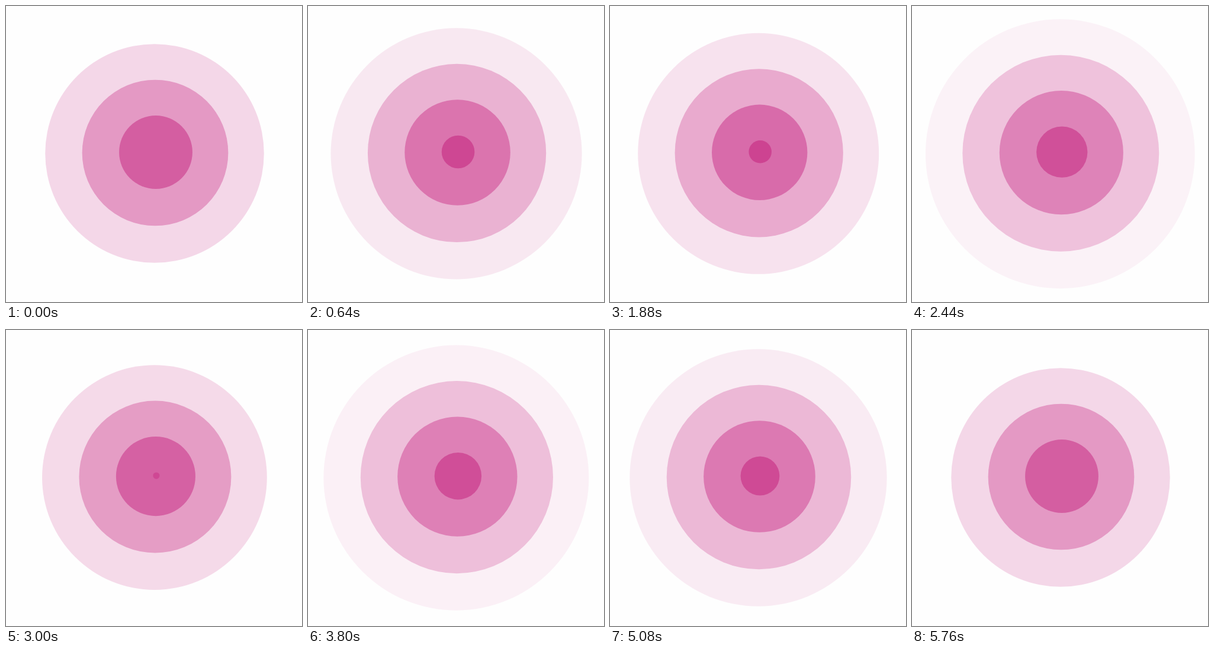
Write an HTML page with a canvas that moves like this. It is 500 px wide and 500 px high and loops after 5800 ms.

```html
<!DOCTYPE html>
<html lang="en">
<head>
<meta charset="utf-8">
<title>Ripple</title>
<style>
  html, body { margin: 0; width: 100%; height: 100%; overflow: hidden; background: #fefefe; }
  canvas { display: block; width: 500px; height: 500px; }
</style>
</head>
<body>
<canvas id="stage" width="500" height="500"></canvas>
<script>
const ctx = document.getElementById('stage').getContext('2d');
const LOOP = 5800, STEP = 40, LIFE = 5760, RINGS = 4;

// p is the age of a ripple, from 0 (born) to 1 (gone)
function ripple(p) {
  const fadeIn = Math.min(1, p / 0.03);
  ctx.fillStyle = `rgba(201, 50, 136, ${0.76 * (1 - p) * fadeIn})`;
  ctx.beginPath();
  ctx.arc(254 - 4 * p, 246 + 4 * p, 0.5 + 245.7 * p, 0, Math.PI * 2);
  ctx.fill();
}

function draw() {
  const time = Math.floor(performance.now() % LOOP / STEP) * STEP;
  const young = time % (LIFE / RINGS) / LIFE;
  ctx.fillStyle = '#fefefe';
  ctx.fillRect(0, 0, 500, 500);
  for (let i = RINGS - 1; i >= 0; i--) ripple(young + i / RINGS);
  requestAnimationFrame(draw);
}
draw();
</script>
</body>
</html>
```
